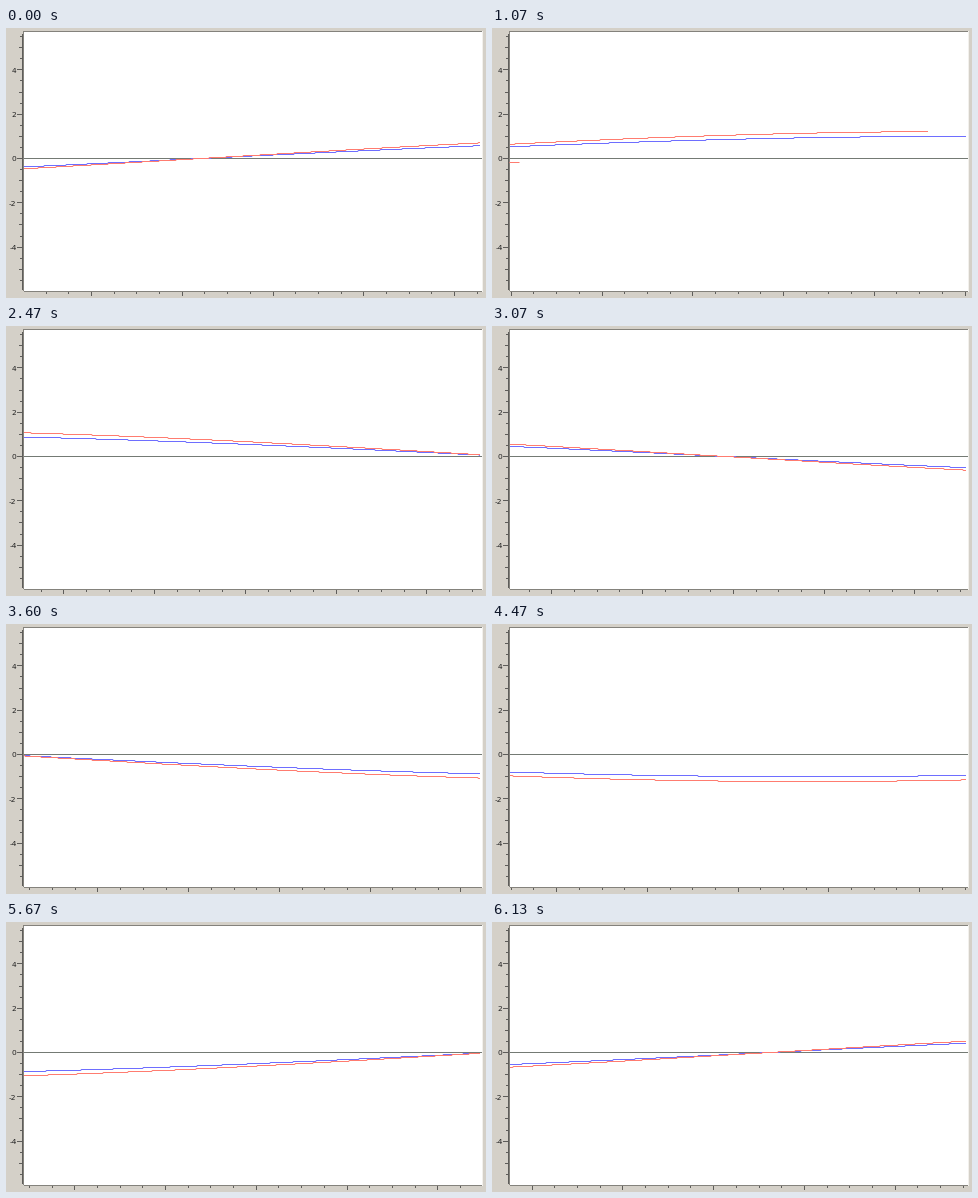
Animation of 480 by 270 pixels, one loop 6.19 s. Source, as a matplotlib script:

```python
import numpy as np
import matplotlib.pyplot as plt
from matplotlib.animation import FuncAnimation
from matplotlib.collections import LineCollection
from matplotlib.patches import Rectangle

W, H, DPI = 480, 270, 100
FRAMES, LOOP = 93, 6190
PX = 72 / DPI                      # one pixel in points
LEFT, RIGHT, TOP, BOTTOM = 18, 476, 4, 263
ZERO_Y, UNIT_Y, UNIT_X = 130.5, 22.15, 453.75
PHASE, RED_GAIN = -0.39, 1.22
STALL = (16, 18)                   # the feed slows, freezes here, catches up

BEIGE, INK, EDGE = "#d4d0c8", "#5e5d5a", "#84827c"
BLUE, RED = "#6e6eff", "#ff7c70"

fig = plt.figure(figsize=(W / DPI, H / DPI), dpi=DPI, facecolor=BEIGE)
ax = fig.add_axes([0, 0, 1, 1])
ax.set_xlim(0, W)
ax.set_ylim(H, 0)
ax.axis("off")


def box(x, y, w, h, color):
    ax.add_patch(Rectangle((x, y), w, h, fc=color, lw=0, antialiased=False))


def value_y(v):
    return ZERO_Y - UNIT_Y * v


def curve(color):
    return ax.plot([], [], color=color, lw=PX, snap=False)[0]


def pixel_row(v):
    return np.floor(value_y(v)) + 0.5


# Sunken canvas
box(LEFT, TOP, RIGHT - LEFT, BOTTOM - TOP, "white")
box(LEFT - 1, TOP - 1, RIGHT - LEFT + 1, 1, EDGE)
box(LEFT - 1, TOP - 1, 1, BOTTOM - TOP + 1, EDGE)
box(RIGHT, TOP - 1, 1, BOTTOM - TOP + 2, "#f2f0ec")
box(LEFT, BOTTOM, RIGHT - LEFT, 1, EDGE)
box(LEFT, int(ZERO_Y), RIGHT - LEFT, 1, "#747a74")

# Vertical scale
box(16, 6, 1, 256, INK)
for k in range(-11, 12):
    size = 5 if k % 4 == 0 else 3 if k % 2 == 0 else 2
    box(16 - size, int(value_y(k / 2)), size, 1, INK)
for v in range(-4, 5, 2):
    ax.text(10.5, value_y(v) + 2.8, f"{v}", ha="right", va="baseline",
            family="DejaVu Sans", fontsize=7.5 * PX, color="#222222")

ticks = LineCollection([], colors=INK, linewidths=PX, snap=False)
ax.add_collection(ticks)
blue, red, stray = curve(BLUE), curve(RED), curve(RED)


def clock(i):
    return np.interp(i, [0, *STALL, 19, 92], [0, 0.946, 0.946, 1.27, 6.1])


def tick_marks(t):
    """Scale marks every 0.05 s, long ones every 0.2 s."""
    first, step = 85.5 - t * UNIT_X, UNIT_X / 20
    k0 = int(np.ceil((LEFT - first) / step))
    k1 = int(np.floor((RIGHT - 1 - first) / step))
    marks = []
    for k in range(k0, k1 + 1):
        x = np.floor(first + k * step) + 0.5
        marks.append([(x, 264), (x, 268 if k % 4 == 0 else 266)])
    return marks


def draw(i):
    t = clock(i)
    stalled = STALL[0] <= i <= STALL[1]

    x = np.arange(LEFT, 474) + 0.5
    wave = np.sin(t + PHASE + (x - LEFT) / UNIT_X)
    blue.set_data(x, pixel_row(wave))
    end = 436 - LEFT if stalled else len(x)
    red.set_data(x[:end], pixel_row(RED_GAIN * wave[:end]))
    stray.set_data([LEFT, 27], [134.5, 134.5])
    stray.set_visible(stalled)
    ticks.set_segments(tick_marks(t))
    return blue, red, stray, ticks


anim = FuncAnimation(fig, draw, frames=FRAMES, interval=LOOP / FRAMES,
                     repeat=True, repeat_delay=0, blit=False)
plt.show()
```
